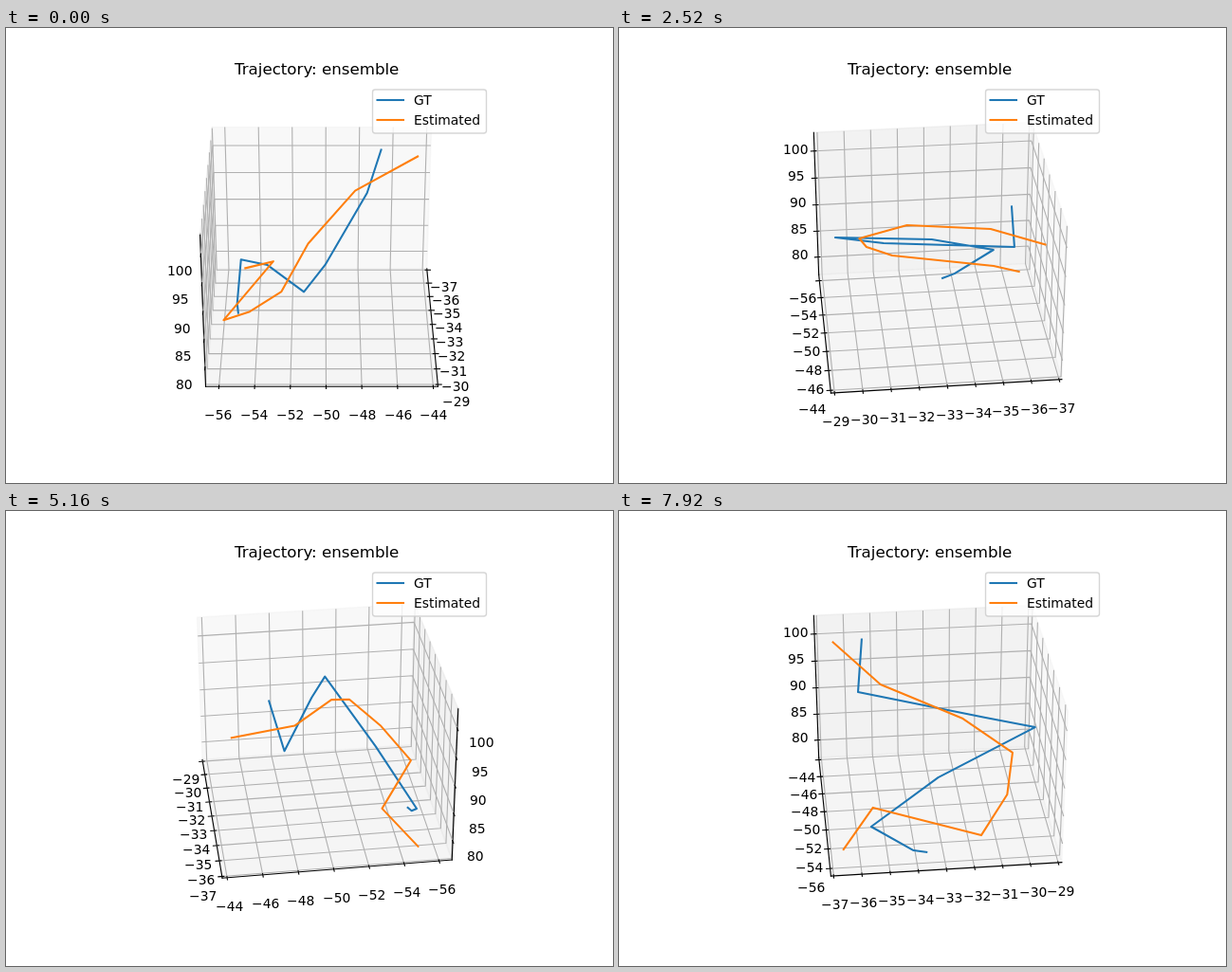
An HTML page with a canvas that plays this animation: 640x480 px, repeating every 8 s.

```html
<!DOCTYPE html>
<html lang="en">
<head>
<meta charset="utf-8">
<title>Trajectory: ensemble</title>
<style>
  html, body { margin: 0; width: 100%; height: 100%; overflow: hidden; background: #fff; }
  canvas { display: block; }
</style>
</head>
<body>
<canvas id="stage" width="640" height="480"></canvas>
<script>
const ctx = document.getElementById('stage').getContext('2d');

const LOOP_MS = 8000, STEP_MS = 120, DEGREES_PER_STEP = 4;
const DISTANCE = 10, SCALE = 1997.8, CENTER = [333, 237.4];
const SIN_ELEV = 0.5, COS_ELEV = Math.sqrt(3) / 2;
const THIN = 1.11, THICK = 2.08;
const FONT = '"DejaVu Sans", sans-serif';

// Half extents of the box; everything else is placed in the same units.
const HALF = [0.5952, 0.5952, 0.4464];
const DELTA = HALF.map(h => h * 0.16);
const LABEL_SHIFT = 1.037;

// nearDim: the direction in which the axis line sits on the viewer's side.
const AXES = [
  { from: -37, to: -29, step: 1, mid: -32.984, unit: 0.14474, nearDim: 1, pane: 242 },
  { from: -56, to: -44, step: 2, mid: -50.238, unit: 0.09147, nearDim: 0, pane: 230 },
  { from: 80, to: 100, step: 5, mid: 89.96, unit: 0.0333, nearDim: 0, pane: 236 },
];

const SERIES = [
  { name: 'GT', color: '#1f77b4', points: [
    [-.356, .316, .430], [-.386, .245, .153], [.271, .017, .086], [.519, -.090, .074],
    [-.013, -.288, -.081], [-.375, -.446, -.258], [-.159, -.462, -.408], [-.091, -.454, -.429]] },
  { name: 'Estimated', color: '#ff7f0e', points: [
    [-.499, .520, .317], [-.270, .178, .229], [.140, -.071, .137], [.385, -.206, -.005],
    [.337, -.372, -.155], [.185, -.518, -.302], [-.352, -.267, -.256], [-.519, -.430, -.398]] },
];

const replaced = (point, dim, value) => point.map((v, i) => i === dim ? value : v);

function projector(azimuth) {
  const c = Math.cos(azimuth), s = Math.sin(azimuth);
  return ([x, y, z]) => {
    const toward = x * c + y * s;
    const k = SCALE / (DISTANCE - toward * COS_ELEV - z * SIN_ELEV);
    return [CENTER[0] + k * (y * c - x * s),
            CENTER[1] - k * (z * COS_ELEV - toward * SIN_ELEV)];
  };
}

function trace(points) {
  ctx.beginPath();
  for (const [x, y] of points) ctx.lineTo(x, y);
}

function line(points, color, width, cap = 'square') {
  trace(points);
  ctx.strokeStyle = color;
  ctx.lineWidth = width;
  ctx.lineCap = cap;
  ctx.lineJoin = 'round';
  ctx.stroke();
}

function text(str, x, y, size, centered) {
  ctx.font = `${size}px ${FONT}`;
  ctx.fillStyle = '#000';
  const left = centered ? x - ctx.measureText(str).width / 2 : x;
  ctx.fillText(str, Math.round(left), Math.round(y));
}

function drawPane(dim, far, project) {
  const u = (dim + 1) % 3, v = (dim + 2) % 3;
  const corners = [[-1, -1], [1, -1], [1, 1], [-1, 1]].map(([a, b]) =>
    project(replaced(replaced(far, u, a * HALF[u]), v, b * HALF[v])));
  const gray = AXES[dim].pane;
  trace(corners);
  ctx.closePath();
  ctx.fillStyle = ctx.strokeStyle = `rgba(${gray},${gray},${gray},.5)`;
  ctx.lineWidth = 1.39;
  ctx.fill();
  ctx.stroke();
}

function drawAxis(dim, far, project) {
  const { from, to, step, mid, unit, nearDim } = AXES[dim];
  const near = far.map(v => -v);
  const edge = replaced(far, nearDim, near[nearDim]);
  const side = Math.sign(near[nearDim]);
  const ticks = [];
  for (let value = from; value <= to; value += step) ticks.push({ value, at: (value - mid) * unit });

  line([-HALF[dim], HALF[dim]].map(v => project(replaced(edge, dim, v))), '#000', THIN);

  for (const { at } of ticks) {
    const fold = replaced(far, dim, at);
    const ends = [1, 2].map(k => (dim + k) % 3).map(d => replaced(fold, d, near[d]));
    line([ends[0], fold, ends[1]].map(project), '#b0b0b0', THIN, 'butt');
  }

  for (const { value, at } of ticks) {
    const base = replaced(edge, dim, at);
    const mark = [-0.1, 0.2].map(f =>
      project(replaced(base, nearDim, base[nearDim] + side * f * DELTA[nearDim])));
    line(mark, '#000', THIN);
    const outside = base.map((v, i) => i === dim ? v : v + Math.sign(v) * LABEL_SHIFT * DELTA[i]);
    const [x, y] = project(outside);
    text(String(value).replace('-', '\u2212'), x, y + 10.8, 13.89, true);
  }
}

function drawLegend() {
  ctx.beginPath();
  ctx.roundRect(386.5, 65, 120, 46, 2.78);
  ctx.fillStyle = 'rgba(255,255,255,.8)';
  ctx.strokeStyle = 'rgba(204,204,204,.8)';
  ctx.lineWidth = 1.39;
  ctx.fill();
  ctx.stroke();
  SERIES.forEach(({ name, color }, i) => {
    const y = 76 + 21 * i;
    line([[391.5, y], [419, y]], color, THICK);
    text(name, 430, y + 5, 13.89);
  });
}

function draw(time) {
  const step = Math.floor(time % LOOP_MS / STEP_MS);
  const azimuth = step * DEGREES_PER_STEP * Math.PI / 180;
  const project = projector(azimuth);
  const far = [
    Math.cos(azimuth) > 0 ? -HALF[0] : HALF[0],
    Math.sin(azimuth) < -1e-9 ? HALF[1] : -HALF[1],
    -HALF[2],
  ];
  ctx.fillStyle = '#fff';
  ctx.fillRect(0, 0, 640, 480);
  for (const dim of [0, 1, 2]) drawPane(dim, far, project);
  for (const dim of [0, 1, 2]) drawAxis(dim, far, project);
  for (const { points, color } of SERIES) line(points.map(project), color, THICK);
  text('Trajectory: ensemble', 328, 49, 16.67, true);
  drawLegend();
}

let start;
function tick(now) {
  start ??= now;
  draw(now - start);
  requestAnimationFrame(tick);
}
draw(0);
requestAnimationFrame(tick);
</script>
</body>
</html>
```
